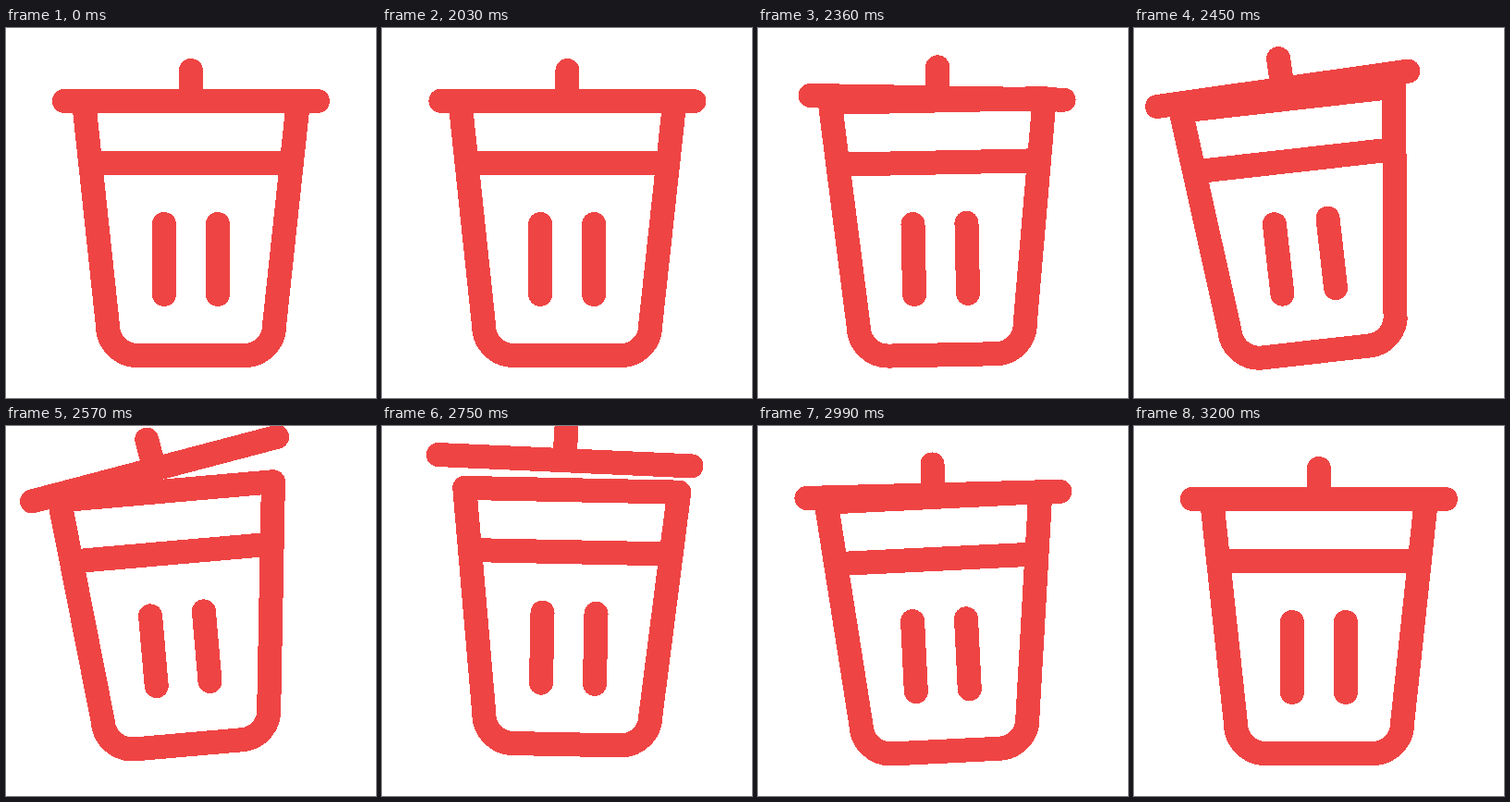
An HTML page that plays this animation: 400 by 400 pixels, repeating every 3230 ms.

```html
<!DOCTYPE html>
<html lang="en">
<head>
<meta charset="utf-8">
<title>Trash bin</title>
<style>
  html, body { margin: 0; width: 100%; height: 100%; overflow: hidden; background: #fff; }
  svg { display: block; width: 100%; height: 100%; }
</style>
</head>
<body>
<svg viewBox="0 0 400 400" fill="none" stroke="#ef4444" stroke-width="26" stroke-linecap="round" stroke-linejoin="round" shape-rendering="crispEdges">
  <g id="bin">
    <path d="M84 79H316L290 322A32 32 0 0 1 258 354H142A32 32 0 0 1 110 322ZM92 146H308M171 212V288M229 212V288"/>
    <path id="lid" d="M63 79H337M200 46V79"/>
  </g>
</svg>
<script>
const LOOP = 3230, STEP = 30, REST = 2030;
const bin = document.getElementById('bin');
const lid = document.getElementById('lid');

const ease = p => (1 - Math.cos(Math.PI * Math.min(1, Math.max(0, p)))) / 2;

// Rises smoothly from 0 to 1 at peak, then sinks back to 0 at end.
const hump = (t, start, peak, end) =>
  t < peak ? ease((t - start) / (peak - start)) : ease((end - t) / (end - peak));

function pose(node, x, y, angle, pivotY) {
  node.setAttribute('transform', `translate(${x} ${y}) rotate(${angle} 200 ${pivotY})`);
}

function drawBin(t) {
  const drift = 4.6 * hump(t, 2740, 3010, 3200) - hump(t, 2570, 2740, 3010);
  const jump = -11 * hump(t, 2310, 2640, 3150);
  const swing = 4.5 * hump(t, 2010, 2250, 2467) - 6.6 * hump(t, 2250, 2467, 2840)
    + 2.4 * hump(t, 2467, 2840, 3020) - 3.2 * hump(t, 2840, 3020, 3200);
  pose(bin, drift, jump, swing, 384);
}

// The lid moves relative to the bin: it flies open, lands and bounces once.
function drawLid(t) {
  const slide = -11.5 * hump(t, 2340, 2620, 2985);
  const lift = -33 * hump(t, 2270, 2720, 2980) - 7 * hump(t, 2935, 3070, 3190);
  const tilt = 2.2 * hump(t, 2250, 2350, 2450) - 10 * hump(t, 2400, 2590, 2760)
    + 3 * hump(t, 2680, 2820, 3140);
  pose(lid, slide, lift, tilt, 79);
}

function draw() {
  const now = performance.now() % LOOP;
  const t = REST + Math.floor((now - REST) / STEP) * STEP;
  drawBin(t);
  drawLid(t);
  requestAnimationFrame(draw);
}
draw();
</script>
</body>
</html>
```
